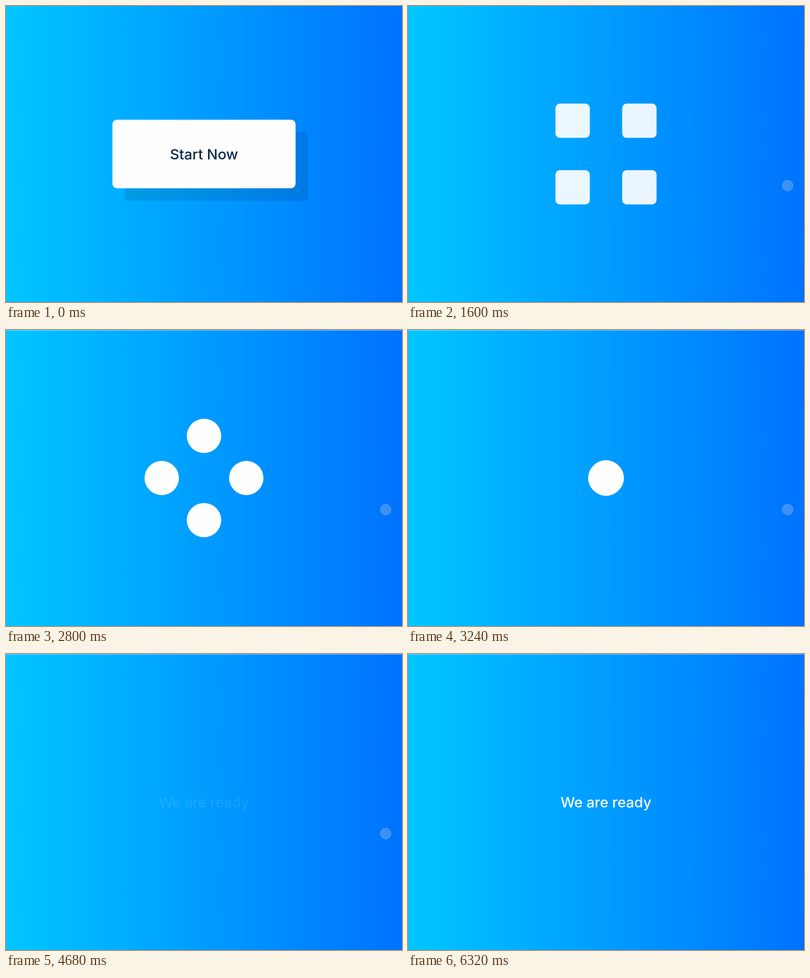
Recreate the animation shown at these times as an HTML page with a canvas. Size 800 by 600 pixels, loop 6.36 s.

```html
<!DOCTYPE html>
<html lang="en">
<head>
<meta charset="utf-8">
<title>Start button</title>
<style>
html, body { margin: 0; width: 100%; height: 100%; overflow: hidden; background: #0093ff; }
canvas { display: block; }
</style>
</head>
<body>
<canvas id="stage" width="800" height="600"></canvas>
<script>
const ctx = document.getElementById('stage').getContext('2d');
const LOOP = 6360, CX = 400, CY = 300, SIZE = 139, DOT = SIZE / 2;
const PULSE = 378, PULSE_START = 2166;

const sky = ctx.createLinearGradient(0, 0, 800, 0);
sky.addColorStop(0, '#00c6ff');
sky.addColorStop(1, '#0072ff');

const lerp = (a, b, k) => a + (b - a) * k;
const span = (t, a, b) => Math.min(1, Math.max(0, (t - a) / (b - a)));
const cubic = k => k < 0.5 ? 4 * k ** 3 : 1 - 4 * (1 - k) ** 3;
const quad = k => k < 0.5 ? 2 * k * k : 1 - 2 * (1 - k) ** 2;

function box(x, y, w, h, r, fill) {
  ctx.beginPath();
  ctx.roundRect(x, y, w, h, r);
  ctx.fillStyle = fill;
  ctx.fill();
}

function label(text, color, alpha) {
  if (alpha <= 0) return;
  ctx.globalAlpha = alpha;
  ctx.font = '500 29px Inter, sans-serif';
  ctx.textAlign = 'center';
  ctx.textBaseline = 'alphabetic';
  ctx.fillStyle = color;
  ctx.fillText(text, CX, 310.5);
  ctx.globalAlpha = 1;
}

function drawButton(t) {
  const press = cubic(span(t, 560, 880));
  const shrink = cubic(span(t, 960, 1400));
  const w = lerp(370, SIZE, shrink), x = CX - w / 2, y = CY - SIZE / 2;
  if (press < 1) {
    const d = 25 * (1 - press);
    box(x + d, y + d, w, SIZE, 9, 'rgba(0,0,0,0.1)');
  }
  box(x, y, w, SIZE, 9, '#fefefe');
  // faint tint on the wings that get absorbed
  const wing = (w - SIZE) / 2;
  ctx.globalAlpha = span(t, 1000, 1120);
  box(x, y, wing, SIZE, [9, 0, 0, 9], '#fbf9fb');
  box(x + w - wing, y, wing, SIZE, [0, 9, 9, 0], '#fbf9fb');
  ctx.globalAlpha = 1;
  label('Start Now', '#0b2a4d', 1 - span(t, 1080, 1330));
}

// Distance of the tiles from the centre, as a fraction of full spread.
function spreadAt(t) {
  if (t < PULSE_START) return lerp(0.5, 1, cubic(span(t, 1360, 1680)));
  const n = (t - PULSE_START) / PULSE, k = cubic(n % 1);
  return Math.floor(n) % 2 ? k : 1 - k;
}

function drawTiles(t) {
  const round = cubic(span(t, 1920, 2180));
  const last = PULSE_START + 5 * PULSE;
  const turn = round + (t >= last ? 1 : 0);
  const d = DOT * spreadAt(t);
  const r = lerp(9, DOT / 2, round);
  const dim = lerp(1, 0.92, span(t, 1360, 1560));
  ctx.save();
  ctx.globalAlpha = lerp(dim, 1, round) * (1 - span(t, last + 60, last + PULSE));
  ctx.translate(CX, CY);
  ctx.rotate(turn * Math.PI / 4);
  // one path, so overlaps stay even
  ctx.beginPath();
  for (const sx of [-1, 1]) {
    for (const sy of [-1, 1]) {
      ctx.roundRect(sx * d - DOT / 2, sy * d - DOT / 2, DOT, DOT, r);
    }
  }
  ctx.fillStyle = '#fefefe';
  ctx.fill();
  ctx.restore();
}

function drawCursor(t) {
  const alpha = span(t, 0, 80) * (1 - span(t, 5240, 5640));
  if (alpha <= 0) return;
  const come = quad(span(t, 40, 660)), go = quad(span(t, 780, 1444));
  const x = lerp(lerp(741, 450, come), 767, go);
  const y = lerp(lerp(58, 301, come), 364, go);
  ctx.globalAlpha = alpha;
  ctx.beginPath();
  ctx.arc(x, y, 10.7, 0, Math.PI * 2);
  ctx.fillStyle = 'rgba(215,215,215,0.28)';
  ctx.fill();
  ctx.strokeStyle = 'rgba(255,255,255,0.28)';
  ctx.lineWidth = 1;
  ctx.stroke();
  ctx.globalAlpha = 1;
}

function draw(t) {
  ctx.fillStyle = sky;
  ctx.fillRect(0, 0, 800, 600);
  if (t >= 2640) {
    ctx.fillStyle = 'rgba(255,255,255,0.6)';
    ctx.fillRect(0, 0, 800, 1);
  }
  if (t < 1360) drawButton(t);
  else if (t < PULSE_START + 6 * PULSE) drawTiles(t);
  label('We are ready', '#fff', quad(span(t, 4530, 5220)));
  drawCursor(t);
}

const start = performance.now();
function tick() {
  draw((performance.now() - start) % LOOP);
  requestAnimationFrame(tick);
}
tick();
</script>
</body>
</html>
```
